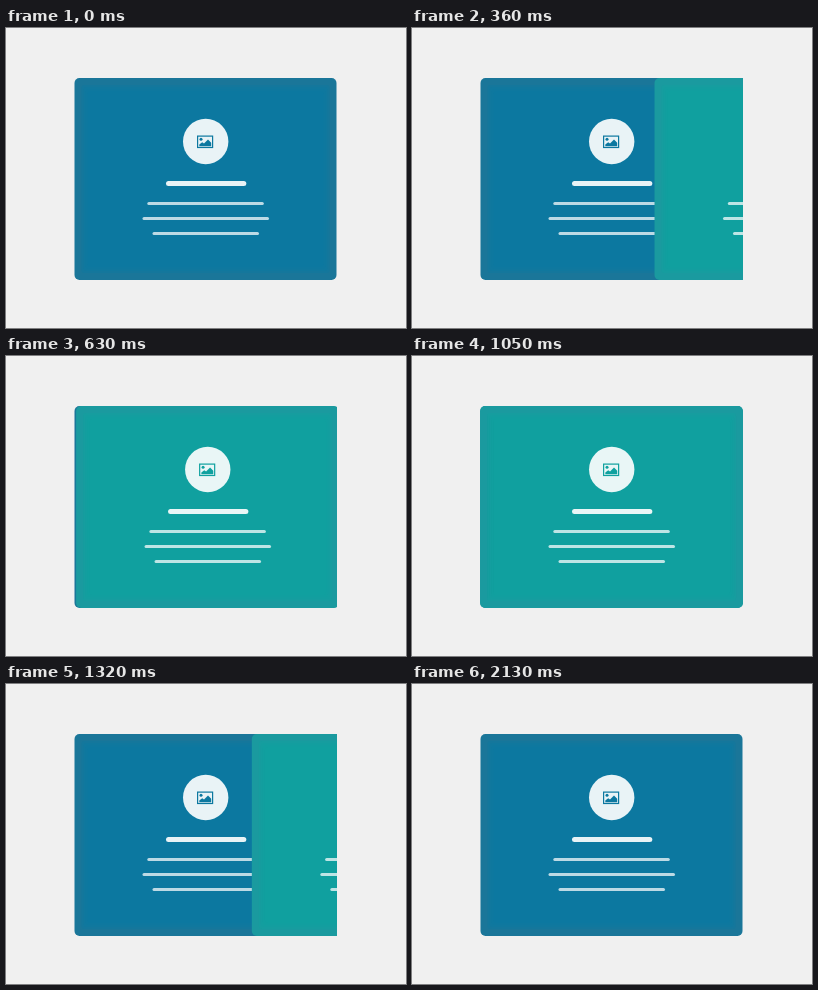
Animation of 400x300 px, one loop 2160 ms. Source, as an HTML page with a canvas:

```html
<!DOCTYPE html>
<html lang="en">
<head>
<meta charset="utf-8">
<title>Sliding card</title>
<style>
  html, body { margin: 0; width: 100%; height: 100%; overflow: hidden; background: #f0f0f0; }
  canvas { display: block; width: 400px; height: 300px; }
</style>
</head>
<body>
<canvas id="stage" width="400" height="300"></canvas>
<script>
const ctx = document.getElementById('stage').getContext('2d');
const LOOP = 2160, STEP = 30, SLIDE = 450, TRAVEL = 262;
const BLUE = { edge: '#1a7699', fill: '#0c78a0', x: 68.5, w: 262 };
const TEAL = { edge: '#1a9a9f', fill: '#0fa19f', x: 68, w: 263 };

// Cubic Bezier easing with handles (a, 0) and (b, 1).
function bezier(a, b) {
  return t => {
    if (t <= 0) return 0;
    if (t >= 1) return 1;
    let low = 0, high = 1, s;
    for (let i = 0; i < 24; i++) {
      s = (low + high) / 2;
      const r = 1 - s;
      const x = 3 * a * s * r * r + 3 * b * s * s * r + s * s * s;
      if (x < t) low = s; else high = s;
    }
    return s * s * (3 - 2 * s);
  };
}
const easeEnter = bezier(0.42, 0.1);
const easeLeave = bezier(0.42, 0.58);

function roundRect(x, y, w, h, r, color) {
  ctx.fillStyle = color;
  ctx.beginPath();
  ctx.roundRect(x, y, w, h, r);
  ctx.fill();
}

function disc(x, y, r, color) {
  ctx.fillStyle = color;
  ctx.beginPath();
  ctx.arc(x, y, r, 0, Math.PI * 2);
  ctx.fill();
}

function pictureIcon(color) {
  ctx.strokeStyle = color;
  ctx.lineWidth = 1.2;
  ctx.strokeRect(191.6, 108.1, 15, 11.4);
  disc(195, 111.3, 1.5, color);
  ctx.beginPath();
  ctx.moveTo(193.3, 118.2);
  ctx.lineTo(193.3, 116.6);
  ctx.lineTo(196.2, 114.2);
  ctx.lineTo(198, 115.6);
  ctx.lineTo(202, 111.6);
  ctx.lineTo(205.2, 114.8);
  ctx.lineTo(205.2, 118.2);
  ctx.fill();
}

function card({ edge, fill, x, w }, offset) {
  ctx.save();
  ctx.translate(offset, 0);
  roundRect(x, 50, w, 202, 5, edge);
  // Soft darker rim towards the edge.
  ctx.globalAlpha = 0.4;
  for (const inset of [7, 9, 11, 13]) {
    roundRect(x + inset, 50 + inset, w - 2 * inset, 202 - 2 * inset, 3, fill);
  }
  ctx.globalAlpha = 1;
  disc(199.7, 113.5, 22.7, 'rgba(255,255,255,.91)');
  pictureIcon(fill);
  roundRect(160, 153, 80.3, 5, 2.5, 'rgba(255,255,255,.91)');
  const line = (left, top, width) => roundRect(left, top, width, 3, 1.5, 'rgba(255,255,255,.73)');
  line(141.3, 174, 116.5);
  line(136.5, 189, 126.5);
  line(146.5, 204, 106.5);
  ctx.restore();
}

function draw(now) {
  const time = Math.floor((now % LOOP) / STEP) * STEP;
  const shown = easeEnter((time - 239) / SLIDE) - easeLeave((time - 1047) / SLIDE);

  ctx.fillStyle = '#f0f0f0';
  ctx.fillRect(0, 0, 400, 300);
  card(BLUE, 0);
  if (shown > 0) {
    ctx.save();
    ctx.beginPath();
    ctx.rect(68, 50, 263, 202);
    ctx.clip();
    card(TEAL, TRAVEL * (1 - shown));
    ctx.restore();
  }
}

let start;
function tick(now) {
  start ??= now;
  draw(now - start);
  requestAnimationFrame(tick);
}
draw(0);
requestAnimationFrame(tick);
</script>
</body>
</html>
```
